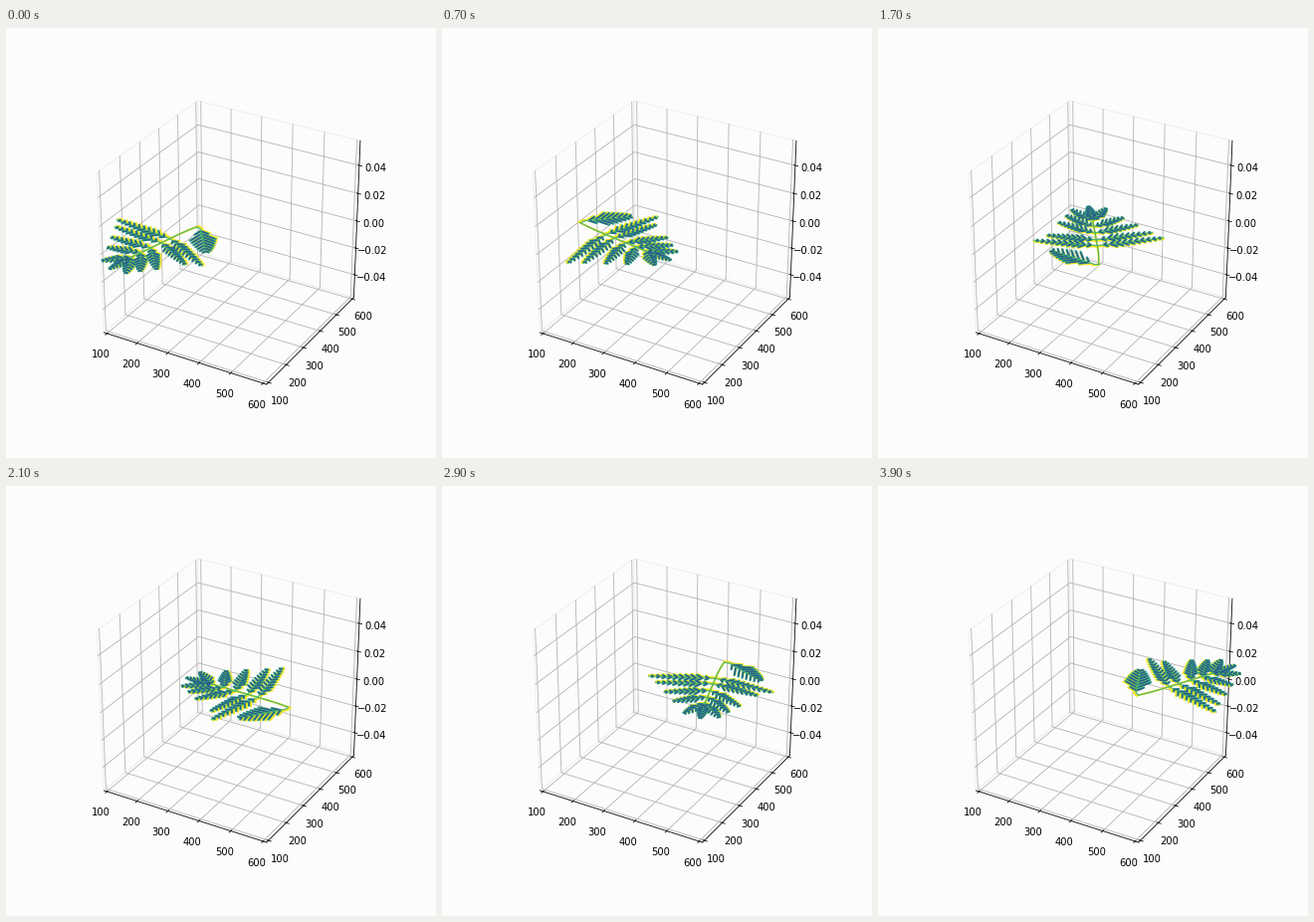
Recreate the animation shown at these times as a matplotlib script. Size 432 by 432 pixels, loop 4000 ms.

```python
import numpy as np
import matplotlib.pyplot as plt
from matplotlib.animation import FuncAnimation
from matplotlib.collections import LineCollection

SIZE, FRAMES, INTERVAL = 432, 40, 100
BG = "#fcfcfc"
EDGE = 0.5 * 25 / 24            # half side of the drawn box, in unit-cube terms
LABEL_OUT = EDGE + 0.0696       # tick label distance from the centre
TICK_IN, TICK_OUT = EDGE - 0.1 / 12, EDGE + 0.2 / 12

# Camera: elevation 30, azimuth -60, distance 10
C, S = np.sqrt(3) / 2, 0.5
RIGHT = np.array([C, S, 0])
UP = np.array([-S * S, S * C, C])
TOWARD = np.array([C * S, -C * C, S])
ORIGIN = np.array([54 + 334.8 * 0.95 / 1.85, 54 + 326.16 * 0.95 / 1.85])
SCALE = np.array([334.8, 326.16]) / 0.185


def project(points):
    p = np.asarray(points, float)
    depth = 10 - p @ TOWARD
    flat = np.stack([p @ RIGHT, p @ UP], axis=-1)
    return ORIGIN + SCALE * flat / depth[..., None]


fig = plt.figure(figsize=(SIZE / 72, SIZE / 72), dpi=72, facecolor=BG)
ax = fig.add_axes([0, 0, 1, 1])
ax.set(xlim=(0, SIZE), ylim=(0, SIZE))
ax.axis("off")


def line(points, color, width=0.8, z=1):
    ax.plot(*project(points).T, color=color, lw=width, zorder=z)


def label(point, text):
    x, y = project(point)
    ax.text(x, y, text, size=10, family="DejaVu Sans",
            ha="center", va="top", zorder=3)


def draw_box():
    e = EDGE
    walls = [
        [(-e, -e, -e), (-e, e, -e), (-e, e, e), (-e, -e, e)],
        [(-e, e, -e), (e, e, -e), (e, e, e), (-e, e, e)],
        [(-e, -e, -e), (e, -e, -e), (e, e, -e), (-e, e, -e)],
    ]
    for wall in walls:
        ax.fill(*project(wall).T, fc=BG, ec="#efefef", lw=1, zorder=0)

    for value in range(100, 601, 100):
        t = (value - 350) / 500
        line([(t, -e, -e), (t, e, -e), (t, e, e)], "#b0b0b0")
        line([(e, t, -e), (-e, t, -e), (-e, t, e)], "#b0b0b0")
        line([(t, -TICK_IN, -e), (t, -TICK_OUT, -e)], "black", z=2)
        line([(TICK_IN, t, -e), (TICK_OUT, t, -e)], "black", z=2)
        label((t, -LABEL_OUT, -LABEL_OUT), str(value))
        label((LABEL_OUT, t, -LABEL_OUT), str(value))

    for value in (-0.04, -0.02, 0, 0.02, 0.04):
        t = value / 0.11
        line([(-e, -e, t), (-e, e, t), (e, e, t)], "#b0b0b0")
        line([(TICK_IN, e, t), (TICK_OUT, e, t)], "black", z=2)
        label((LABEL_OUT, LABEL_OUT, t), f"{value:.2f}".replace("-", "\u2212"))

    line([(-e, -e, -e), (e, -e, -e)], "black", z=2)
    line([(e, -e, -e), (e, e, -e)], "black", z=2)
    line([(e, e, -e), (e, e, e)], "black", z=2)


def stem(y):
    return np.array([0.01 - 0.09 * max(y + 0.2, 0), y])


def pinna(base, tip, count, width):
    """Short leaflets on both sides of an axis, shrinking to a sharp tip."""
    base, tip = np.array(base), np.array(tip)
    along = (tip - base) / np.linalg.norm(tip - base)
    across = np.array([-along[1], along[0]])
    parts = []
    for t in np.linspace(0.1, 0.93, count):
        root = base + t * (tip - base)
        size = width * min(1, t / 0.2) * (1 - t) ** 0.6
        for side in (-1, 1):
            parts.append((root, root + size * (0.7 * along + 0.72 * side * across)))
    return parts, [(base, tip)]


def build_fern():
    rows = [
        (-0.11, (0.37, -0.02), (-0.35, -0.05), 10),
        (-0.045, (0.31, 0.04), (-0.28, 0.01), 9),
        (0.035, (0.23, 0.13), (-0.22, 0.16), 8),
        (0.11, (0.15, 0.215), (-0.178, 0.24), 7),
        (0.18, (0.05, 0.325), (-0.145, 0.31), 6),
    ]
    sprays = [((-0.02, -0.31), (-0.25, -0.16), 8, 0.115),
              (stem(0.18), (-0.05, 0.35), 7, 0.05)]
    for y, right, left, count in rows:
        for tip in (right, left):
            sprays.append((stem(y), tip, count, 0.056))
    leaflets, ribs = [], []
    for spray in sprays:
        parts, rib = pinna(*spray)
        leaflets += parts
        ribs += rib
    ys = np.linspace(-0.31, 0.25, 9)
    ribs += [(stem(a), stem(b)) for a, b in zip(ys, ys[1:])]
    ribs.append((stem(-0.31), np.array([-0.02, -0.31])))
    return np.array(leaflets), np.array(ribs)


draw_box()
leaflets, ribs = build_fern()
outline = np.concatenate([leaflets, ribs])
first, last = leaflets[:, :1], leaflets[:, 1:]
cores = np.concatenate([first + 0.15 * (last - first),
                        first + 0.88 * (last - first)], axis=1)

# Contour-like bands, from the pale rim to the dark inside
layers = []
for segs, color, width in [
    (outline + [0, -0.013], "#f3e51e", 2.0),
    (leaflets, "#2c9b80", 2.3),
    (ribs, "#4fb567", 1.2),
    (cores, "#2b5c8a", 1.3),
]:
    band = LineCollection([], colors=color, linewidths=width,
                          capstyle="round", zorder=5 + len(layers))
    ax.add_collection(band, autolim=False)
    layers.append((band, segs))


def update(i):
    angle = np.radians(160.5 + 13.5 * i)
    c, s = np.cos(angle), np.sin(angle)
    turn = np.array([[c, s], [-s, c]])
    centre = (np.array([189, 208]) + 8.36 * i - 350) / 500
    for band, segs in layers:
        flat = segs @ turn + centre
        ground = np.zeros(flat.shape[:-1] + (1,))
        band.set_segments(project(np.concatenate([flat, ground], axis=-1)))
    return [band for band, _ in layers]


anim = FuncAnimation(fig, update, frames=FRAMES, interval=INTERVAL,
                     repeat=True, repeat_delay=0, blit=False)
plt.show()
```
